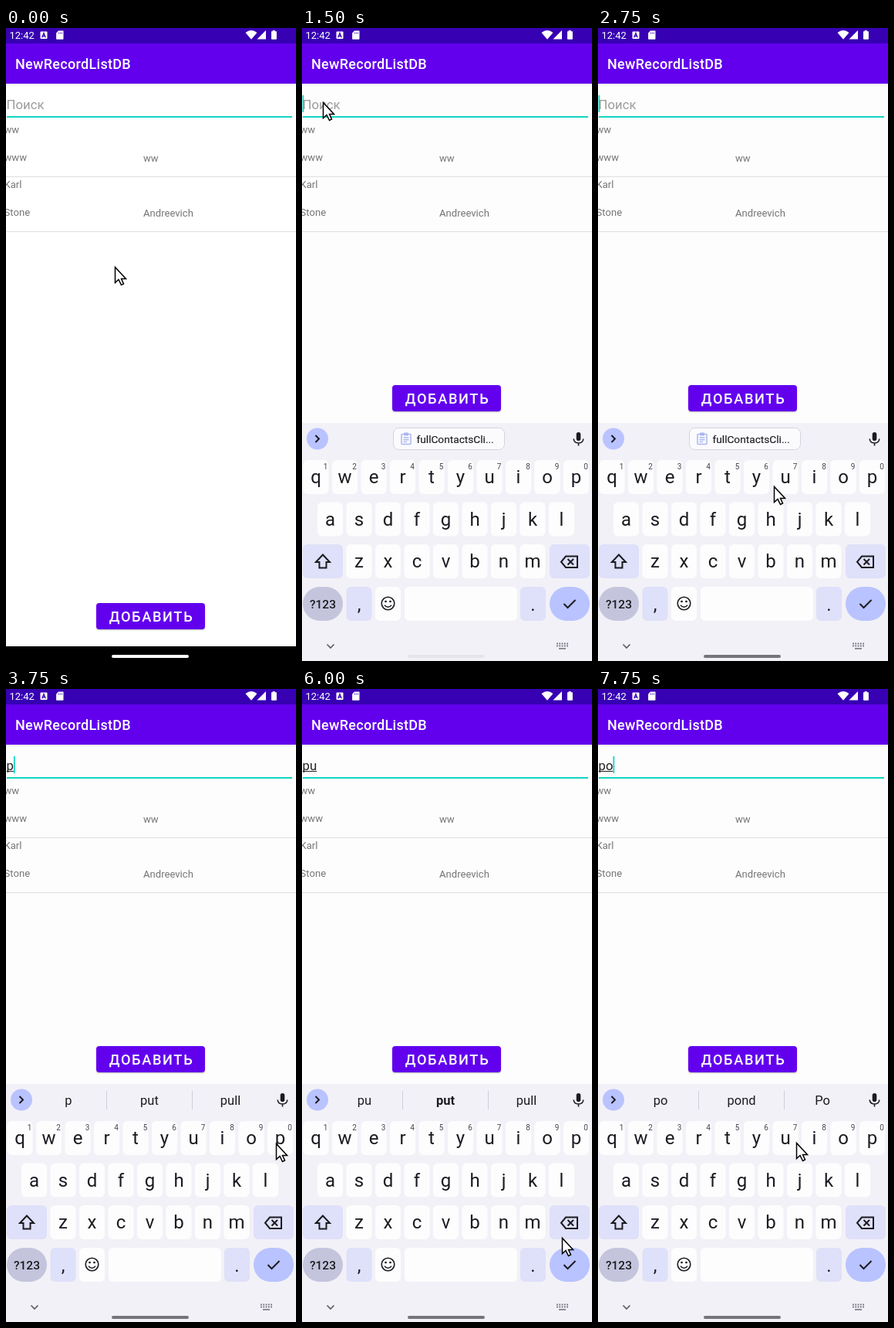
Write an HTML page that moves like this. It is 376 by 819 pixels and loops after 8 s.

```html
<!DOCTYPE html>
<html lang="ru">
<head>
<meta charset="utf-8">
<title>Contact search</title>
<style>
html, body { margin: 0; width: 100%; height: 100%; overflow: hidden; background: #fff; }
svg { display: block; font-family: Roboto, sans-serif; }
text { white-space: pre; }
.mid { text-anchor: middle; }
.row { font-size: 13.1px; fill: #757575; }
.key { font-size: 24px; fill: #1b1b20; text-anchor: middle; }
.num { font-size: 10px; fill: #45464f; text-anchor: middle; }
.tip { font-size: 16.5px; fill: #1b1b20; text-anchor: middle; }
.ico { fill: none; stroke: #1b1b20; stroke-width: 2; }
.thin { stroke-width: 1.6; }
</style>
</head>
<body>
<svg width="376" height="819" viewBox="0 0 376 819">
  <defs>
    <linearGradient id="shade" x2="0" y2="1">
      <stop offset="0" stop-color="#000" stop-opacity=".08"/>
      <stop offset="1" stop-color="#000" stop-opacity="0"/>
    </linearGradient>
  </defs>
  <rect id="page" width="376" height="819"/>

  <g id="bar">
    <rect y="72" width="376" height="3" fill="url(#shade)"/>
    <rect width="376" height="72" fill="#6200ee"/>
    <rect width="376" height="20" fill="#3700b3"/>
    <g fill="#fff">
      <text x="4.5" y="14" font-size="13">12:42</text>
      <rect x="44.5" y="4.5" width="9" height="9.5" rx="1"/>
      <path d="M68 3.5h6q.5 0 .5.6V14q0 .7-.7.7h-8q-.7 0-.7-.7V6.5z"/>
      <path d="M310.5 6q7.5-6 15 0l-7.5 8.8z"/>
      <path d="M337 3v11.5h-11.5z"/>
      <path d="M345.7 3h3v1.2h1.7q.5 0 .5.5v9.3q0 .7-.7.7h-5.5q-.7 0-.7-.7V4.700q0-.5.5-.5h1.200z"/>
      <text x="12" y="53" font-size="18" font-weight="500" letter-spacing=".3">NewRecordListDB</text>
    </g>
    <path d="M46.7 12.2 49 6.5l2.3 5.7M47.5 10.5h3" fill="none" stroke="#3700b3" stroke-width="1.3"/>
    <path d="M68.5 5.5v2M70.5 5.5v2M72.5 5.5v2" stroke="#3700b3" stroke-width=".8"/>
  </g>

  <text id="hint" x=".5" y="105" font-size="16.8" fill="#9b9b9b">Поиск</text>
  <text id="query" x=".5" y="105" font-size="16.8" fill="#212121"></text>
  <path id="under" stroke="#212121"/>
  <rect x="1" y="114" width="370" height="2" fill="#14d5c2"/>
  <rect id="caret" y="87" width="1.8" height="22" fill="#14d5c2"/>

  <g class="row">
    <text x="-2.5" y="136">ww</text>
    <text x="-2.5" y="172">www</text>
    <text x="178" y="173">ww</text>
    <text x="-2.5" y="207">Karl</text>
    <text x="-2.5" y="243">Stone</text>
    <text x="178" y="244">Andreevich</text>
  </g>
  <path d="M0 192.5H376M0 263.5H376" stroke="#dedede"/>

  <g id="add">
    <rect x="116.5" y="745" width="142" height="35" rx="4" opacity=".07"/>
    <rect x="117" y="745" width="141" height="34" rx="4" opacity=".15"/>
    <rect x="117" y="744" width="141" height="34" rx="4" fill="#6200ee"/>
    <text class="mid" x="188.5" y="768" font-size="18.2" font-weight="500" letter-spacing="1.65" fill="#fff">ДОБАВИТЬ</text>
  </g>

  <rect id="nav" y="800" width="376" height="19"/>

  <g id="board">
    <rect y="511" width="376" height="308" fill="#f2f1f7"/>
    <circle cx="20" cy="531.5" r="14" fill="#b9c3ff"/>
    <path class="ico" d="M17.5 527l4.5 4.5-4.5 4.5"/>
    <rect x="355.7" y="523" width="5.6" height="11" rx="2.8" fill="#1b1b20"/>
    <path class="ico thin" d="M352.2 531.5q.5 5.5 6.3 5.5t6.3-5.500M358.5 537v3.5"/>

    <g id="clip">
      <rect x="118.5" y="517.5" width="144" height="28" rx="7" fill="#fbfbfe" stroke="#d3d4de"/>
      <g fill="none" stroke="#aab6f2" stroke-width="1.5">
        <rect x="129" y="525.5" width="12" height="13" rx="1"/>
        <path d="M131.5 530h7M131.5 532.8h7M131.5 535.5h4.5"/>
      </g>
      <rect x="132" y="523.5" width="6" height="4" rx="1" fill="#aab6f2"/>
      <text x="148.5" y="537" font-size="13.7" fill="#1b1b20" stroke="#1b1b20" stroke-width=".15">fullContactsCli...</text>
    </g>
    <g id="tips">
      <path d="M130.5 520v24M241.5 520v24" stroke="#cfcfd8"/>
      <text class="tip" x="81" y="538"></text>
      <text class="tip" x="186" y="538"></text>
      <text class="tip" x="291" y="538"></text>
    </g>

    <g id="keys"></g>

    <path class="ico" d="M27 681.5l-9 9.5h4.5v7.5h9v-7.5h4.5z"/>
    <path class="ico" d="M342 683.5h15v14.5h-15l-6-7.250zM344.5 687l7.5 7.5M352 687l-7.5 7.5"/>
    <text class="mid" x="27" y="751" font-size="15.5" font-weight="500" fill="#1b1b20">?123</text>
    <circle class="ico thin" cx="111.5" cy="744.5" r="8.3"/>
    <path class="ico thin" d="M107 746.7q4.500 5 9 0"/>
    <circle cx="108.5" cy="742" r="1.3"/>
    <circle cx="114.5" cy="742" r="1.3"/>
    <path class="ico" d="M339.5 745l5 5 10-10"/>
    <path d="M32.5 797.5l4.5 4.5 4.5-4.5" fill="none" stroke="#5c5c64" stroke-width="1.6"/>
    <path d="M330 796.5h15M330 799.5h15" stroke="#77777f" stroke-width="1.8" stroke-dasharray="1.8 1.5"/>
    <path d="M333 803h9" stroke="#77777f" stroke-width="1.6"/>
  </g>

  <rect id="pill" x="137" y="811" width="100" height="4" rx="2"/>
  <path id="mouse" d="M.5.5V20.5L5 16.5 8.5 23.5 11.5 22 8.5 15.5H14.5Z" fill="#fff" stroke="#000" stroke-width="1.5"/>
</svg>
<script>
const LOOP = 8000, STEP = 250, OPEN = 1500;
const $ = id => document.getElementById(id);
const show = (id, on) => $(id).style.display = on ? '' : 'none';

// time, x, y of the pointer
const path = [
  [0, 141, 309], [250, 137, 300], [500, 112, 248], [1000, 44, 116], [1250, 31, 94],
  [1500, 27, 96], [1750, 31, 110], [2250, 130, 380], [2750, 228, 593],
  [3250, 335, 588], [3500, 350, 588], [3750, 350, 588], [4000, 325, 590],
  [4250, 260, 591], [4500, 236, 590], [4750, 198, 593], [5000, 203, 614],
  [5250, 235, 632], [5750, 330, 706], [6000, 337, 710], [6250, 344, 692],
  [6500, 344, 690], [6750, 342, 670], [7250, 312, 592], [7500, 310, 587], [7750, 257, 587]
];

// time, typed text, suggestions, whether the middle one is bold
const edits = [
  [OPEN, ''],
  [3750, 'p', ['p', 'put', 'pull']],
  [4500, 'pu', ['pu', 'put', 'pull'], true],
  [6500, 'p', ['p', 'put', 'pull']],
  [7500, 'po', ['po', 'pond', 'Po']]
];

function buildKeys() {
  const out = [], soft = '#dfe0f9', white = '#fdfdfe';
  const cap = (x, y, w, fill, r = 6) =>
    out.push(`<rect x="${x}" y="${y}" width="${w}" height="44" rx="${r}" fill="${fill}"/>`);
  const label = (s, x, y, cls = 'key') =>
    out.push(`<text class="${cls}" x="${x}" y="${y}">${s}</text>`);
  [['qwertyuiop', 18, 559], ['asdfghjkl', 36.5, 613.5], ['zxcvbnm', 74, 668]].forEach(([row, x0, y], r) => {
    [...row].forEach((c, i) => {
      const x = x0 + 37.5 * i;
      cap(x - 16.5, y, 33, white);
      label(c, x, y + 30);
      if (!r) label((i + 1) % 10, x + 12.5, y + 12, 'num');
    });
  });
  cap(1, 668, 52, soft);
  cap(321, 668, 52, soft);
  cap(1, 723, 52, '#c4c5dd', 22);
  cap(57.5, 723, 33, soft);
  cap(95, 723, 33, white);
  cap(133, 723, 146, white);
  cap(283, 723, 33, soft);
  cap(321, 723, 52, '#b9c3ff', 22);
  label(',', 74, 754);
  label('.', 299.5, 754);
  $('keys').innerHTML = out.join('');
}

function pointAt(t) {
  const i = path.findLastIndex(p => p[0] <= t);
  const a = path[i], b = path[i + 1] || a;
  const k = b === a ? 0 : (t - a[0]) / (b[0] - a[0]);
  return [1, 2].map(n => Math.round(a[n] + (b[n] - a[n]) * k));
}

function draw(ms) {
  const t = Math.floor(ms % LOOP / STEP) * STEP;
  const open = t >= OPEN;
  const [since, word, tips, bold] = edits.findLast(e => e[0] <= t) || [0, ''];

  $('page').setAttribute('fill', open ? '#fdfdfd' : '#fff');
  $('add').setAttribute('transform', `translate(0 ${open ? -282 : 0})`);
  show('board', open);
  show('nav', !open);
  $('pill').setAttribute('fill', !open ? '#fff' : t === OPEN ? '#e6e5eb' : '#77757c');

  show('hint', !word);
  $('query').textContent = word;
  const w = word ? $('query').getComputedTextLength() : 0;
  $('under').setAttribute('d', word ? `M1 106.5H${0.5 + w}` : '');
  $('caret').setAttribute('x', 0.5 + w);
  show('caret', open && (t - since) % 1000 < 500);

  show('clip', !tips);
  show('tips', tips);
  if (tips) $('tips').querySelectorAll('text').forEach((el, i) => {
    el.textContent = tips[i];
    el.setAttribute('font-weight', bold && i === 1 ? 700 : 400);
  });

  $('mouse').setAttribute('transform', `translate(${pointAt(t)})`);
}

buildKeys();
const start = performance.now();
function tick() {
  draw(performance.now() - start);
  requestAnimationFrame(tick);
}
tick();
</script>
</body>
</html>
```
